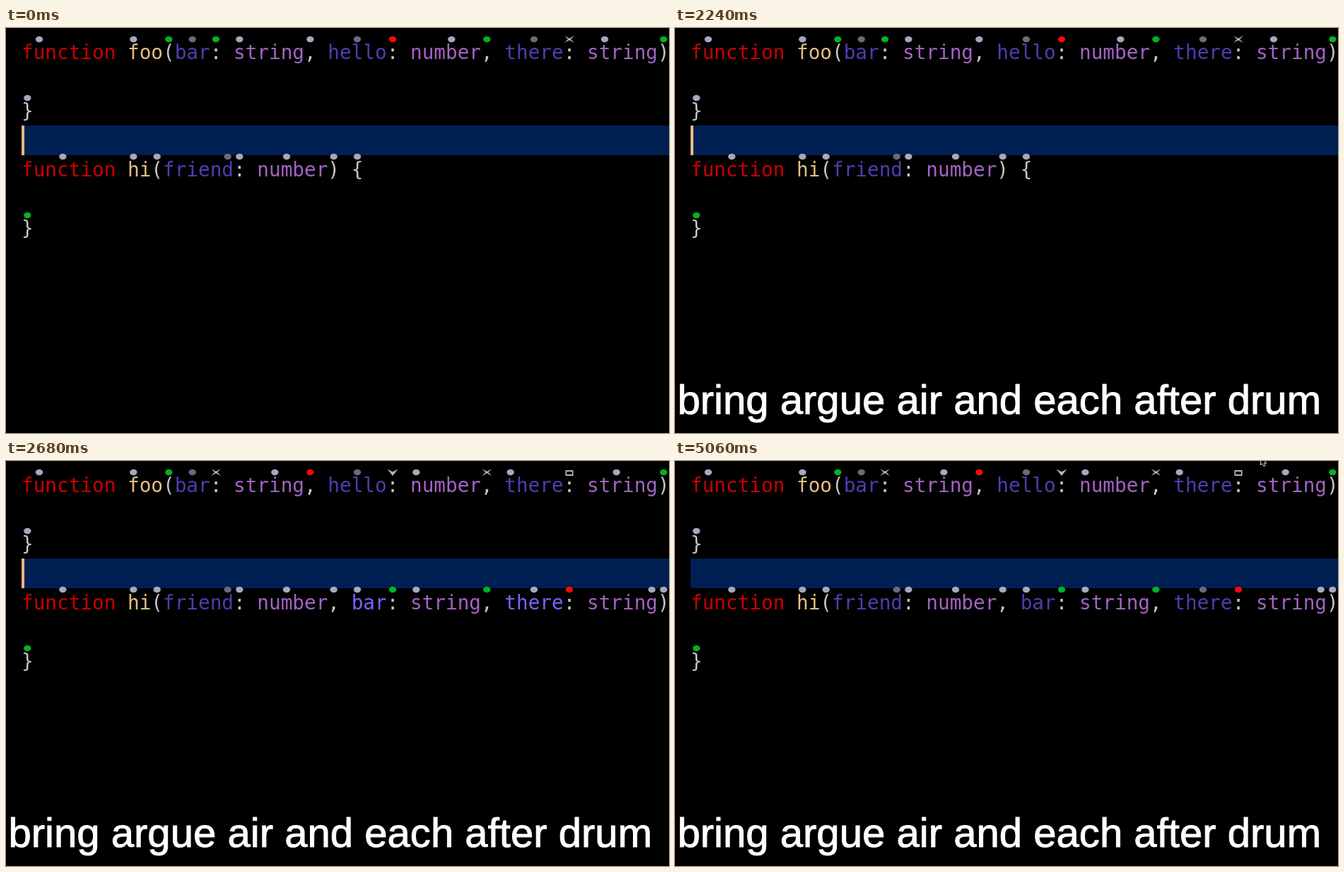
Animation, 938 px wide and 573 px high, one loop 5210 ms. Source, as an HTML page with a canvas:

```html
<!DOCTYPE html>
<html lang="en">
<head>
<meta charset="utf-8">
<title>Code edit by voice</title>
<style>
html, body { margin: 0; width: 100%; height: 100%; overflow: hidden; background: #000; }
canvas { display: block; }
</style>
</head>
<body>
<canvas id="stage" width="938" height="573"></canvas>
<script>
const ctx = document.getElementById('stage').getContext('2d');
const W = 938, H = 573, LOOP = 5210;
const LEFT = 22, CELL = 16.667, TOP = 13.8, ROW = 41.5, BASELINE = 30.2;

const T = { caption: 2240, mark: 2390, insert: 2540, plain: 2680, settle: 2830, pointer: 5060 };
const BLINKS = [450, 900, 1500, 1940, 2390, 2540, 2980, 3570, 4020, 4470, 5060];

const INK = {
  key: '#cb0000', name: '#e6bf83', param: '#4c3eaf', type: '#a463c2', punct: '#c6c6c6',
  fresh: '#7863ff', markParam: '#4152d0', markType: '#9a68ca', flashType: '#9a5fb4'
};
const HAT = { l: '#a9a7bf', d: '#6c6a7a', g: '#00b421', r: '#f80808' };

const colX = c => LEFT + c * CELL;
const rowY = r => TOP + r * ROW;

function band(row, from, to, color) {
  const y = Math.round(rowY(row));
  const x = Math.round(colX(from));
  ctx.fillStyle = color;
  ctx.fillRect(x, y, Math.round(colX(to)) - x, Math.round(rowY(row + 1)) - y);
}

// Tokens are [text, ink] pairs laid out on the character grid.
function code(row, col, tokens) {
  ctx.font = '27.69px "DejaVu Sans Mono", "Noto Sans Mono", monospace';
  for (const [text, ink] of tokens) {
    ctx.fillStyle = INK[ink];
    ctx.fillText(text, colX(col), rowY(row) + BASELINE);
    col += text.length;
  }
}

const arg = (name, type, nameInk = 'param', typeInk = 'type') =>
  [[name, nameInk], [': ', 'punct'], [type, typeInk]];

const path = (points) => {
  ctx.beginPath();
  points.forEach(([x, y]) => ctx.lineTo(x, y));
};

function hat(row, col, kind) {
  ctx.save();
  ctx.translate(colX(col + 0.5), rowY(row) + 2.2);
  ctx.fillStyle = HAT[kind] || '#b3b2bd';
  ctx.strokeStyle = '#b3b2bd';
  ctx.lineWidth = 1.8;
  if (kind === 'x') {
    path([[-7, -5], [0, -1.2], [7, -5], [2, 0], [7, 5], [0, 1.2], [-7, 5], [-2, 0]]);
    ctx.fill();
  } else if (kind === 'v') {
    path([[-7.5, -4.5], [0, -0.8], [7.5, -4.5], [0, 5]]);
    ctx.fill();
  } else if (kind === 'b') {
    ctx.strokeRect(-4.7, -2, 9.4, 6);
  } else {
    ctx.beginPath();
    ctx.ellipse(0, 0, 5.2, 4.2, 0, 0, Math.PI * 2);
    ctx.fill();
  }
  ctx.restore();
}

// Hats are written as "column+kind", e.g. "12g".
const hats = (row, list) => list.split(' ').forEach(h => hat(row, parseInt(h), h.slice(-1)));

function caption(text) {
  ctx.font = '58.1px "Liberation Sans", Arial, sans-serif';
  ctx.fillStyle = ctx.strokeStyle = '#fff';
  ctx.lineWidth = 1;
  ctx.lineJoin = 'round';
  ctx.fillText(text, 3.4, 546);
  ctx.strokeText(text, 3.4, 546);
}

function pointer() {
  path([[828.5, -5], [828.5, 5.5], [831, 3.6], [833, 7.6], [835.2, 6.6], [833.6, 3], [837, 3]]);
  ctx.closePath();
  ctx.fillStyle = '#000';
  ctx.fill();
  ctx.strokeStyle = '#d8d8d8';
  ctx.lineWidth = 1;
  ctx.lineJoin = 'round';
  ctx.stroke();
}

function draw(t) {
  const marked = t >= T.mark && t < T.insert;
  const inserted = t >= T.insert;
  const flash = inserted && t < T.plain;
  const settled = t >= T.settle;
  const caret = BLINKS.filter(b => b <= t).length % 2 === 0;

  ctx.fillStyle = '#000';
  ctx.fillRect(0, 0, W, H);

  band(3, 0, 55, '#001f53');
  if (marked) {
    band(0, 13, 24, '#00324e');
    band(0, 41, 54, '#00324e');
  }
  if (flash) band(4, 26, 54, '#53008c');
  if (caret) {
    ctx.fillStyle = '#e6b980';
    ctx.fillRect(22, 138, 4, 42);
  }

  const inks = marked ? ['markParam', 'markType'] : [];
  code(0, 0, [
    ['function ', 'key'], ['foo', 'name'], ['(', 'punct'],
    ...arg('bar', 'string', ...inks), [', ', 'punct'],
    ...arg('hello', 'number'), [', ', 'punct'],
    ...arg('there', 'string', ...inks), [')', 'punct']
  ]);
  code(2, 0, [['}', 'punct']]);
  code(4, 0, [
    ['function ', 'key'], ['hi', 'name'], ['(', 'punct'], ...arg('friend', 'number')
  ]);
  if (inserted) {
    const added = [settled ? 'param' : 'fresh', flash ? 'flashType' : 'type'];
    code(4, 26, [
      [', ', 'punct'], ...arg('bar', 'string', ...added),
      [', ', 'punct'], ...arg('there', 'string', ...added), [')', 'punct']
    ]);
  } else {
    code(4, 26, [[') {', 'punct']]);
  }
  code(6, 0, [['}', 'punct']]);

  hats(0, '1l 9l 12g 14d 28d 54g');
  hats(0, inserted
    ? '16x 21l 24r 31v 33l 39x 41l 46b 50l'
    : '16g 18l 24l 31r 36l 39g 43d 46x 49l');
  hats(2, '0l');
  hats(4, '3l 9l 11l 17d 18l 22l 26l 28l');
  if (inserted) hats(4, '31g 33l 39g 46r 53l 54l ' + (settled ? '43d' : '43l'));
  hats(6, '0g');

  if (t >= T.caption) caption('bring argue air and each after drum');
  if (t >= T.pointer) pointer();
}

const start = performance.now();
function tick() {
  draw((performance.now() - start) % LOOP);
  requestAnimationFrame(tick);
}
tick();
</script>
</body>
</html>
```
